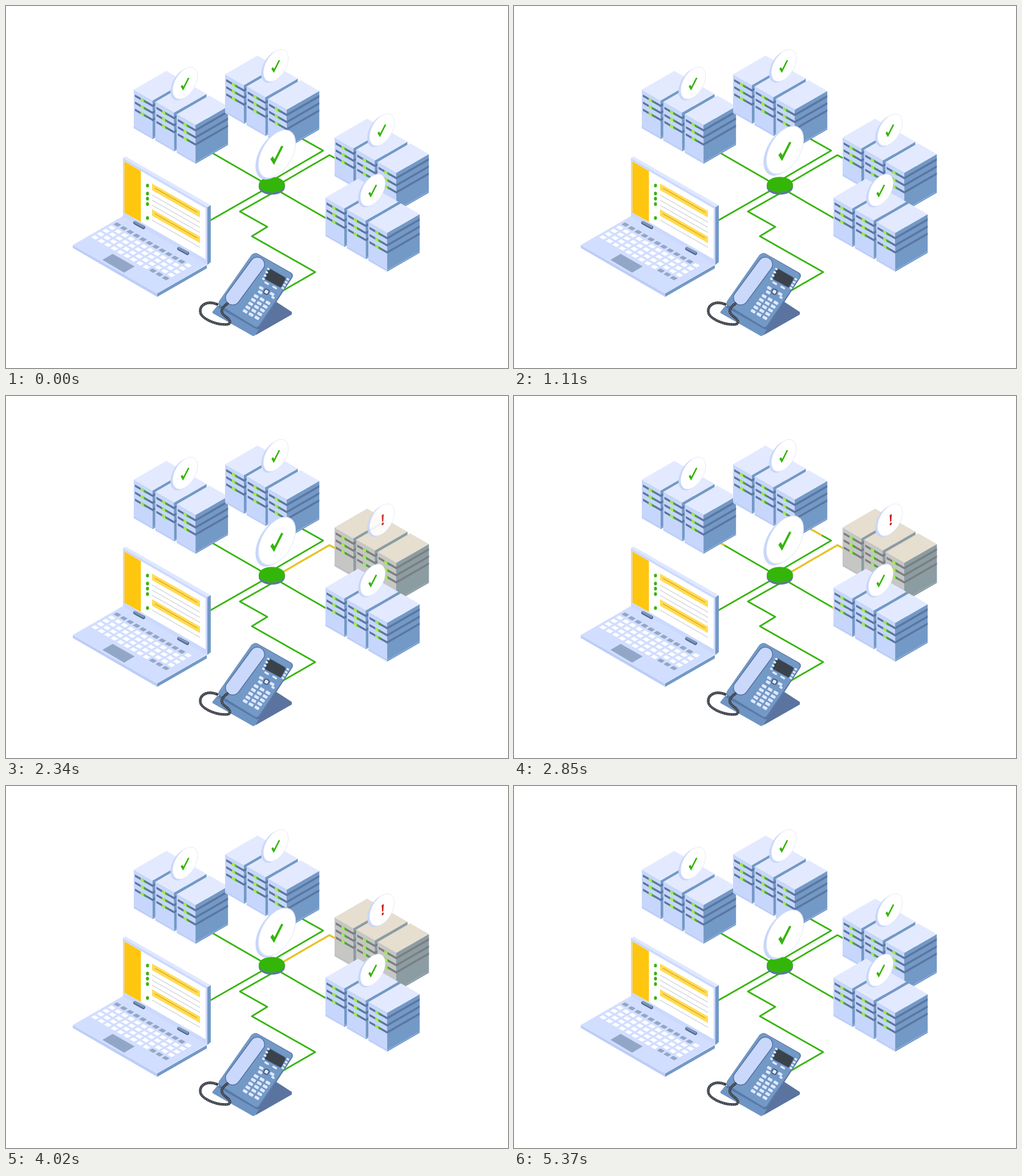
An HTML page that plays this animation: 880 px wide and 636 px high, repeating every 5400 ms.

```html
<!DOCTYPE html>
<html lang="en">
<head>
<meta charset="utf-8">
<title>Server network</title>
<style>
html, body { margin: 0; width: 100%; height: 100%; overflow: hidden; background: #fff; }
svg { display: block; width: 880px; height: 636px; }
.wire, .pulse { fill: none; stroke-width: 2.8; stroke-linejoin: round; }
.wire { stroke: #34b50a; }
.pulse { stroke: #f8c01e; stroke-dasharray: 22 200; }
.device { animation: device 5400ms linear infinite; }
.reply { animation: reply 5400ms linear infinite; }
.fault { stroke-dasharray: 100 200; animation: fault 5400ms linear infinite; }
.bob { animation: bob 900ms cubic-bezier(.364, 0, .636, 1) infinite alternate; }
.ok { animation: okFade 5400ms linear infinite, okMove 5400ms cubic-bezier(.33, 1, .68, 1) infinite; }
.bad { animation: badFade 5400ms linear infinite, badMove 5400ms cubic-bezier(.33, 1, .68, 1) infinite; }
.down { animation: down 5400ms linear infinite; }

@keyframes bob { to { transform: translateY(-8px); } }
@keyframes device {
  0%, 27.96% { stroke-dashoffset: -101; }
  42.78%, 76.67% { stroke-dashoffset: 23; }
  91.48%, 100% { stroke-dashoffset: -101; }
}
@keyframes reply {
  0%, 50.74% { stroke-dashoffset: -101; }
  65.56%, 100% { stroke-dashoffset: 23; }
}
@keyframes fault {
  0%, 36.67% { stroke-dashoffset: 101; }
  42.59%, 83.33% { stroke-dashoffset: 0; }
  93.15%, 100% { stroke-dashoffset: -101; }
}
@keyframes okFade {
  0%, 30.56% { opacity: 1; }
  36.48%, 91.67% { opacity: 0; }
  97.22%, 100% { opacity: 1; }
}
@keyframes okMove {
  0%, 30.56% { transform: translateY(0); }
  36.48%, 91.67% { transform: translateY(-18.5px); }
  97.22%, 100% { transform: translateY(0); }
}
@keyframes badFade {
  0%, 38.15% { opacity: 0; }
  44.07%, 83.52% { opacity: 1; }
  89.44%, 100% { opacity: 0; }
}
@keyframes badMove {
  0%, 38.15% { transform: translateY(-18.5px); }
  44.07%, 83.52% { transform: translateY(0); }
  89.44%, 100% { transform: translateY(-18.5px); }
}
@keyframes down {
  0%, 35.19% { opacity: 0; }
  40.74%, 87.04% { opacity: 1; }
  93.52%, 100% { opacity: 0; }
}
</style>
</head>
<body>
<svg id="stage" viewBox="0 0 880 636"></svg>
<script>
const poly = (points, fill) => `<polygon points="${points}" fill="${fill}"/>`;
const path = (d, attrs) => `<path d="${d}" ${attrs}/>`;
const at = (x, y, body) => `<g transform="translate(${x} ${y})">${body}</g>`;
const anim = (name, body) => `<g class="${name}">${body}</g>`;
const range = n => [...Array(n).keys()];

const BLUE = { top: '#e3eaff', left: '#c7d6fc', right: '#7399c6', slot: '#5b76a0', rim: '#a9c0ee' };
const GREY = { top: '#e6decf', left: '#c6c6c5', right: '#8b9da3', slot: '#7c7e80', rim: '#b3b3b2' };

// Cabinet with its left corner of the top face at 0,0
function cabinet(c) {
  const slots = [7.4, 19.8, 32.2].map(y =>
    poly(`2,${y + 1} 33,${y + 19} 33,${y + 23} 2,${y + 5}`, c.slot) +
    poly(`33,${y + 19} 90,${y - 14} 90,${y - 10} 33,${y + 23}`, c.slot) +
    poly(`17,${y + 9.9} 22,${y + 12.8} 22,${y + 16.8} 17,${y + 13.9}`, '#45a83a') +
    poly(`12,${y + 6.8} 17.5,${y + 10} 17.5,${y + 15} 12,${y + 11.8}`, '#a5ea4a')
  ).join('');
  return poly('0,0 33,19 33,87 0,68', c.left) +
    poly('33,19 90,-14 90,54 33,87', c.right) +
    poly('0,0 57,-33 90,-14 33,19', c.top) + slots +
    path('M0 65.5L33 84.5L90 51.5', `fill="none" stroke="${c.rim}" stroke-width=".8"`);
}

const cluster = (x, y, c = BLUE) =>
  at(x, y, range(3).map(i => at(i * 37.6, i * 21.6, cabinet(c))).join(''));

const CHECK = path('M-11 1L-5.5 11.5L10.8 -8.5', 'fill="none" stroke="#34b50a" stroke-width="5.4"');
const ALERT = path('M-2.8 -13.5H3.6L2.2 5H-1.4Z', 'fill="#cf1d1a"') +
  '<circle cx=".4" cy="11" r="3.2" fill="#cf1d1a"/>';

// Disc standing on the isometric plane that faces right
function badge(x, y, scale, mark) {
  const plane = `matrix(.866 -.5 0 1 0 0) scale(${scale})`;
  const d = 1.6 + 3.2 * scale;
  return at(x, y,
    `<g transform="translate(${-d} ${d / 2}) ${plane}"><circle r="38" fill="#c8d6fb"/></g>` +
    `<g transform="${plane}"><circle r="37.6" fill="#fff" stroke="#dfe5f8" stroke-width="1.2"/>${mark}</g>`);
}
const small = (x, y, mark = CHECK) => badge(x, y, .67, mark);

// Every wire starts at the hub
const wires = [
  ['reply', 'M466 318.5L350 251.5'],
  ['reply', 'M446 318.5L556 254L515 231'],
  ['reply', 'M466 318L575 381'],
  ['device', 'M466 315L312 403'],
  ['device', 'M470 327L410 361L458 388L431 404.5L542 467.5L484 501'],
  ['fault', 'M466 320.5L567 262L594 277']
];
const drawWires = () =>
  wires.map(w => path(w[1], 'class="wire"')).join('') +
  wires.map(w => path(w[1], `class="pulse ${w[0]}" pathLength="100"`)).join('');

const hub = () =>
  path('M443 314V318A23 13.5 0 0 0 489 318V314Z', 'fill="#5c789e"') +
  '<ellipse cx="466" cy="314" rx="23" ry="13.7" fill="#34b50a"/>';

function laptop() {
  const keys = range(5).map(r => range(12).map(c => {
    const dark = (r === 0 && c < 11) || (r === 4 && c > 8);
    return `<rect x="${c * 13}" y="${r * 11.3}" width="8.8" height="7" rx=".8" fill="${dark ? '#93a7c6' : '#fff'}"/>`;
  }).join('')).join('');
  const slant = (y, color, w) =>
    path(`M256 ${y}L340 ${y + 48}`, `stroke="${color}" stroke-width="${w}"`);
  const bar = y =>
    poly(`256,${y} 340,${y + 48} 340,${y + 59.5} 256,${y + 11.5}`, '#ffdc52') +
    path(`M261 ${y + 8}L335 ${y + 50.5}`, 'stroke="#dd9c22" stroke-width="1.2"');
  const hinge = (x, y) => at(x, y,
    path('M-7.5 -3.2L7.5 5', 'stroke="#4f6990" stroke-width="6" stroke-linecap="round"') +
    path('M-7.5 -4.2L7.5 4', 'stroke="#7f97bb" stroke-width="3.5" stroke-linecap="round"'));
  return poly('117,420 265,505 265,511 117,425', '#bccdf8') +
    poly('265,505 352,455 352,461 265,511', '#7399c6') +
    poly('117,420 205,369 352,454 265,505', '#d2deff') +
    `<g transform="matrix(.866 .5 -.866 .5 194.5 380)">${keys}</g>` +
    poly('187,435.5 225.5,457.5 207,468.5 169,446', '#92a7c7') +
    poly('353,353 359,349.5 359,450 353,455', '#7399c6') +
    poly('205,267 209.5,264.3 359,350 353,353.5', '#e0e8ff') +
    poly('205,267 353,353 353,455 205,369.5', '#cbd9ff') +
    poly('207.5,273 350,355.5 350,445 207.5,363', '#fff') +
    poly('207.5,273 236.5,290 236.5,379.3 207.5,363', '#ffc610') +
    [332, 341, 350, 376].map(y => slant(y, '#c9ccd2', 1.1)).join('') +
    bar(312) + bar(357) +
    [315.5, 329.5, 338.5, 348, 372.5].map(y =>
      `<ellipse cx="248" cy="${y}" rx="2.6" ry="3.3" fill="#34b50a"/>`).join('') +
    hinge(233.5, 384) + hinge(310.5, 429.5);
}

function phone() {
  const key = (x, y, w = 8, h = 5) =>
    `<rect x="${-w / 2}" y="${-h / 2}" width="${w}" height="${h}" rx="1.6" fill="#dfe8ff" transform="translate(${x} ${y}) rotate(30)"/>`;
  const pad = range(5).map(r => range(3).map(c =>
    key(438.5 - r * 4.8 + c * 10.3, 510 + r * 6.6 + c * 5.7, 8.6, 5.2)).join('')).join('');
  const sides = range(4).map(i =>
    key(460 - i * 2.9, 462 + i * 5.8, 5, 3.6) + key(494 - i * 2.9, 480 + i * 5.2, 5, 3.6)).join('');
  const cord = 'M388 523C378 530 374 537 384 545C396 553 395 560 383 559.5C364 559 341 548 340.5 537C340 523 355 518 370 524';
  const grip = (w, color) =>
    path('M440.5 454L397.5 512.5', `stroke="${color}" stroke-width="${w}" stroke-linecap="round"`);
  return poly('468,516 501,537.5 501,542 438,578 434,556', '#5b749f') +
    path('M371 526L362 537L362 539.5L433 580L437 578.5L443 568Z', 'fill="#6e94c3"') +
    path('M374 525L441 564L441 569L372 529.5Z', 'fill="#587aa8"') +
    path('M431 437Q436 432 442 435.5L500 468.5Q505 472 501.5 478L446 563Q442 568 437 565.5L375 528Q370 523.5 374 518Z', 'fill="#5b78a6"') +
    path('M430 437.5Q435 432.5 441 436L498 469Q503 472.5 499.5 478L443 562Q440 565.5 436 563L375 525.5Q371 522 374.5 517Z', 'fill="#7399c6"') +
    grip(27, '#58739f') + grip(24, '#cad8fc') +
    path('M462 461L489 476.5Q491 478 490 480L483 493Q482 495 480 494L455 480.5Q453 479 454 477L459.5 462Q460.5 460 462 461Z', 'fill="#3a434b" stroke="#526b92" stroke-width="1"') +
    sides + key(457, 487, 9, 3.6) + key(471, 494.5, 9, 3.6) +
    key(447.5, 495.5) + key(445.5, 503) + key(466.5, 506) + key(468, 512, 6, 4) +
    `<rect x="-4" y="-4" width="8" height="8" rx="2" fill="#dfe8ff" stroke="#405474" stroke-width="1.8" transform="translate(456.5 502) rotate(28)"/>` +
    pad +
    path(cord, 'fill="none" stroke="#343941" stroke-width="4.6" stroke-linecap="round"') +
    path(cord, 'fill="none" stroke="#8d939c" stroke-width="3.2" stroke-dasharray=".9 2.2"');
}

document.getElementById('stage').innerHTML =
  drawWires() +
  cluster(224, 147) + small(314, 135.5) +
  cluster(384, 120) + small(473, 104.5) +
  cluster(576, 231) + anim('down', cluster(576, 231, GREY)) +
  anim('ok', small(659, 217.5)) + anim('bad', small(659, 217.5, at(2, 1, ALERT))) +
  cluster(560, 336.5) + small(643, 323.5) +
  hub() + anim('bob', badge(475, 260, 1, CHECK)) +
  laptop() + phone();
</script>
</body>
</html>
```
